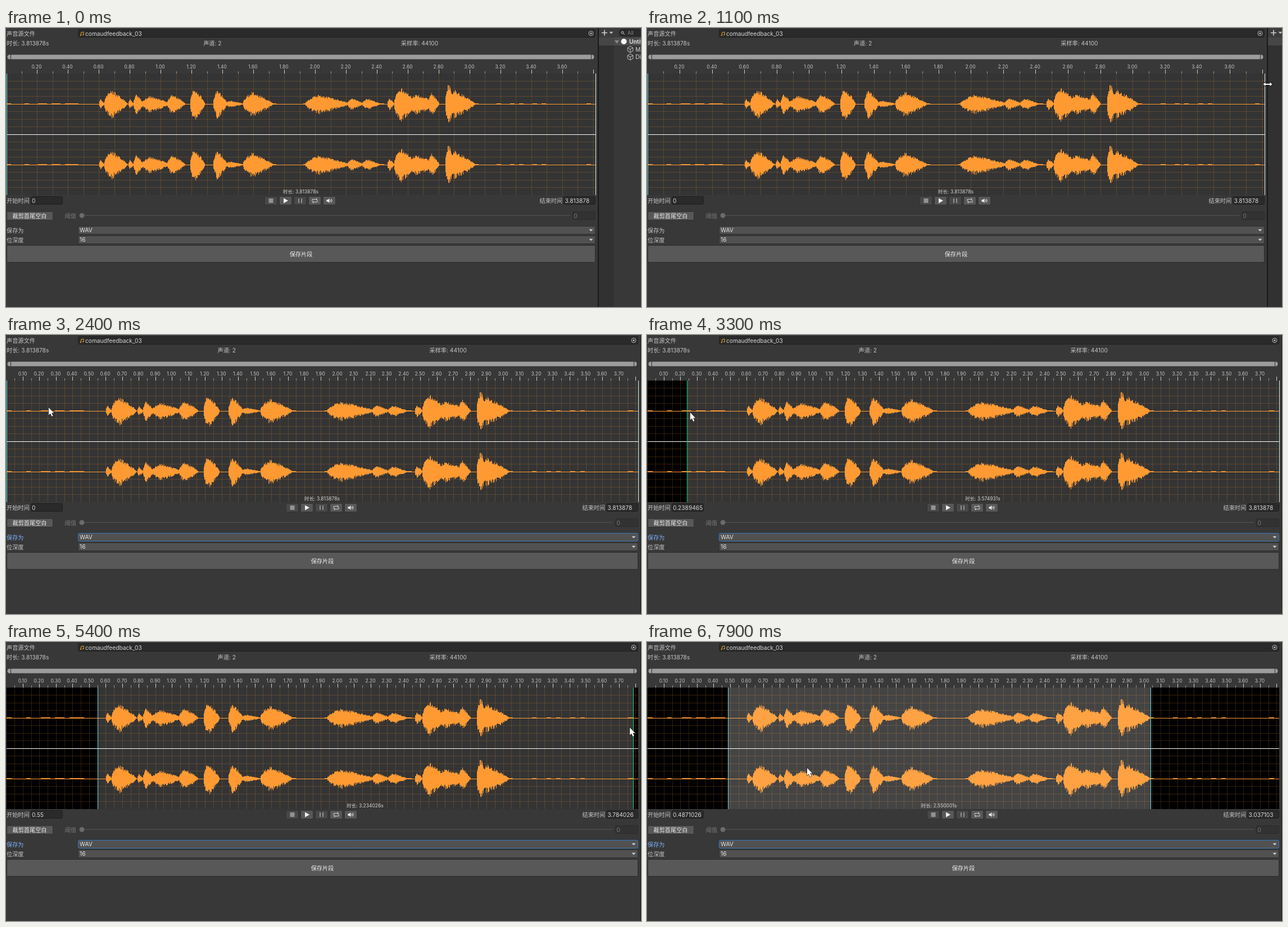
These frames come from a looping animation (1130x496 px, 8000 ms). An HTML page with a canvas:

```html
<!DOCTYPE html>
<html lang="zh">
<head>
<meta charset="utf-8">
<title>Audio clip editor</title>
<style>
html, body { margin: 0; width: 100%; height: 100%; overflow: hidden; background: #383838; }
canvas { display: block; }
</style>
</head>
<body>
<canvas id="stage" width="1130" height="496"></canvas>
<script>
const ctx = document.getElementById('stage').getContext('2d');
const LOOP = 8000, STEP = 100, LENGTH = 3.813878, SAMPLES = 1049;
const TOP = 81, BOTTOM = 297, MIDDLE = 189, HEIGHT = BOTTOM - TOP;
const ORANGE = '#ff9a33', GRID = 'rgba(255,150,45,.19)', LABEL = '#c4c4c4', VALUE = '#d6d6d6';
const CYAN = '#6fdcdc', GREEN = '#12d488';
const FAMILY = 'Inter, "Noto Sans CJK SC", "Noto Sans CJK", sans-serif';

// Spoken syllables: first sample, last sample, loudness
const syllables = [
  [164, 174, 9], [173, 215, 26], [216, 226, 9], [225, 244, 18], [240, 292, 15], [285, 318, 18],
  [326, 353, 30], [367, 393, 26], [388, 422, 6], [420, 475, 22], [531, 612, 17], [606, 635, 11],
  [632, 665, 10], [677, 690, 11], [689, 730, 31], [712, 768, 18], [750, 770, 21], [780, 800, 39], [782, 834, 25]
];

const clamp = v => Math.min(1, Math.max(0, v));
const smooth = k => k * k * (3 - 2 * k);
const noise = n => { const s = Math.sin(n * 127.1 + 11.7) * 43758.5453; return s - Math.floor(s); };

// Quick attack, slower decay
function swell(u) {
  if (u <= 0 || u >= 1) return 0;
  return u < .3 ? Math.sqrt(u / .3) : ((1 - u) / .7) ** .8;
}
const wave = Array.from({ length: SAMPLES }, (_, i) => {
  const loud = Math.max(...syllables.map(([from, to, height]) => height * swell((i - from) / (to - from))));
  return [loud * (.68 + .32 * noise(i)), loud * 1.08 * (.58 + .42 * noise(i + 5000))];
});

// Eased movement through key points [time, ...values]
function track(keys, t) {
  const next = keys.findIndex(key => t <= key[0]);
  if (next <= 0) return keys.at(next).slice(1);
  const a = keys[next - 1], b = keys[next], k = smooth((t - a[0]) / (b[0] - a[0]));
  return a.slice(1).map((v, i) => v + (b[i + 1] - v) * k);
}

const startKeys = [[2900, 0], [3800, .573], [4100, .5689366], [4300, .55], [7450, .55], [7900, .4871026]];
const endKeys = [[5300, LENGTH], [6100, 3.119143], [6400, 3.1]];
const pointerKeys = [
  [100, 1113, 46], [400, 1054, 105], [1100, 1105, 100], [1800, 1129, 103], [2400, 76, 129], [2800, 7, 136],
  [4400, 168, 144], [4800, 1118, 148], [5300, 1119, 152], [6300, 909, 159], [6900, 908, 159],
  [7200, 470, 327], [7500, 304, 230], [7900, 285, 224]
];
const panelWidth = t => Math.round(1049 + 76 * (1 - (1 - clamp((t - 700) / 1120)) ** 2.4));

const dragsPanel = t => t >= 400 && t <= 1800;
const dragsStart = t => t >= 3000 && t < 4500;
const dragsEnd = t => t >= 5400 && t < 7000;
const dragsRange = t => t >= 7500;

function box(x, y, w, h, fill, stroke, radius = 2) {
  ctx.beginPath();
  ctx.roundRect(x + .5, y + .5, w - 1, h - 1, radius);
  ctx.fillStyle = fill;
  ctx.fill();
  if (stroke) { ctx.strokeStyle = stroke; ctx.lineWidth = 1; ctx.stroke(); }
}
function rect(x, y, w, h, fill) { ctx.fillStyle = fill; ctx.fillRect(x, y, w, h); }
function text(str, x, y, color = LABEL, size = 10.2, align = 'left', weight = 400) {
  ctx.font = `${weight} ${size}px ${FAMILY}`;
  ctx.textAlign = align;
  ctx.fillStyle = color;
  ctx.fillText(str, x, y + size * .36);
}
function shape(d, x, y, fill, stroke, width = 1) {
  const path = new Path2D(d);
  ctx.save();
  ctx.translate(x, y);
  if (stroke) { ctx.strokeStyle = stroke; ctx.lineWidth = width; ctx.stroke(path); }
  if (fill) { ctx.fillStyle = fill; ctx.fill(path); }
  ctx.restore();
}
const DOWN = 'M-3.5-1.8h7L0 1.9z';
const dot = (x, y, r, fill) => box(x - r - .5, y - r - .5, r * 2 + 1, r * 2 + 1, fill, null, r);

function header(right) {
  text('声音源文件', 1, 10);
  box(128, 2, right - 128, 15, '#2a2a2a', '#212121');
  shape('M1.5 6V1L6 0V5', 132, 7, null, '#e8a52c');
  dot(132.7, 13, 1.1, '#e8a52c');
  dot(137.2, 12, 1.1, '#e8a52c');
  text('comaudfeedback_03', 141, 10, VALUE);
  shape('M4 0A4 4 0 1 1-4 0A4 4 0 1 1 4 0', right - 8, 9.5, null, '#bdbdbd');
  dot(right - 8, 9.5, 1.6, '#bdbdbd');
  text(`时长: ${LENGTH}s`, 1, 27);
  text('声道: 2', right / 3 + 1.5, 27);
  text('采样率: 44100', right * 2 / 3 + 3.5, 27);
  box(2, 47, right - 4, 9, '#9c9c9c', null, 4);
  for (const x of [8, right - 8]) rect(x, 47, 1, 9, '#333');
}

function drawWave(right, center) {
  for (let x = 1; x < right; x++) {
    const i = Math.floor((x - 1) / (right - 1) * SAMPLES), [up, down] = wave[i];
    const above = Math.max(up, noise(i >> 3) > .7 ? 1 : 0);
    rect(x, center - above, 1, above + Math.max(1, down), ORANGE);
  }
}

function timeline(right, start, end, toX, t) {
  const startX = Math.floor(toX(start)), endX = Math.floor(toX(end));
  const unit = right > 1110 ? .05 : .1;

  rect(1, TOP, right - 1, HEIGHT, '#000');
  rect(startX, TOP, endX - startX, HEIGHT, '#343434');

  for (let i = 1; i * unit < LENGTH; i++) {
    const x = Math.floor(toX(i * unit)), major = i % 2 === 0;
    rect(x, TOP, 1, HEIGHT, GRID);
    rect(x, major ? 74 : 77, 1, major ? 7 : 4, major ? '#d0d0d0' : '#999');
    if (major && i * unit < 3.75) text((i * unit).toFixed(2), x - .5, 69, LABEL, 8.5, 'center');
  }
  for (let i = 1; i < 16; i++) rect(1, Math.floor(TOP + i * 13.5), right - 1, 1, GRID);

  drawWave(right, 135);
  drawWave(right, 243);
  if (dragsRange(t)) rect(startX, TOP, endX - startX, HEIGHT, 'rgba(255,255,255,.08)');
  rect(1, MIDDLE, right - 1, 1, '#fff');
  rect(startX, TOP, 1, HEIGHT, dragsStart(t) ? GREEN : CYAN);
  rect(endX, TOP, 1, HEIGHT, dragsEnd(t) ? GREEN : end < LENGTH ? CYAN : '#d8eeee');
  text(`时长: ${(end - start).toFixed(6)}s`, (startX + endX) / 2 - .5, 290.5, VALUE, 8.5, 'center');
}

function transport(right, start, end) {
  text('开始时间', 1, 307);
  box(44, 299, 57, 15, '#2a2a2a', '#1f1f1f');
  text(String(+start.toFixed(7)), 46, 307, VALUE);
  text('结束时间', right - 99.5, 307);
  box(right - 57, 299, 57, 15, '#2a2a2a', '#1f1f1f');
  text(String(+end.toFixed(6)), right - 54.5, 307, VALUE);

  const left = Math.round(right / 2 - 64.5);
  const iconX = i => left + i * 26 + 11.5;
  for (let i = 0; i < 5; i++) {
    const disabled = i === 0 || i === 2;
    box(left + i * 26, 299, 23, 16, disabled ? '#484848' : '#585858', '#323232');
  }
  rect(iconX(0) - 4, 303, 8, 8, '#929292');
  shape('M-3.5-4.5L4.5 0L-3.5 4.5z', iconX(1), 307, '#f2f2f2');
  shape('M-3.5-4h2v8h-2zM1.5-4h2v8h-2z', iconX(2), 307, '#929292');
  shape('M-4.5 1V-2.5H4M2-4.5L4.2-2.5L2-.5M4.5-1V2.5H-4M-2 .5L-4.2 2.5L-2 4.5', iconX(3), 307, null, '#cfcfcf');
  shape('M-5-1.7h2.5L0-4V4L-2.5 1.7H-5z', iconX(4), 307, '#eee');
  shape('M1.5-1.8Q3 0 1.5 1.8M3.2-3.2Q6 0 3.2 3.2', iconX(4), 307, null, '#eee');
}

function dropdown(right, y, name, value, active) {
  text(name, 1, y + 8, active ? '#7baefa' : LABEL);
  box(128, y, right - 128, 15, '#515151', active ? '#3a79bb' : '#303030');
  text(value, 131, y + 7.5, '#e4e4e4');
  shape(DOWN, right - 8, y + 7.5, '#d0d0d0');
}

function settings(right, focused) {
  box(1, 326, 83, 16, '#585858', '#303030');
  text('裁剪首尾空白', 42, 334, '#eee', 10.2, 'center');
  text('阈值', 104.5, 334, '#797979');
  rect(131, 332.5, right - 176, 1.5, '#4d4d4d');
  dot(135, 333.3, 4.4, '#6b6b6b');
  box(right - 41, 326, 41, 15, '#323232', '#2b2b2b');
  text('0', right - 38.5, 334, '#797979');
  dropdown(right, 352, '保存为', 'WAV', focused);
  dropdown(right, 369, '位深度', '16', false);
  box(1, 386, right - 1, 31, '#585858', '#2c2c2c');
  text('保存片段', right / 2 + .5, 402, '#eee', 10.2, 'center');
}

function sceneItem(name, y) {
  shape('M0-5.5L4.8-2.8V2.8L0 5.5L-4.8 2.8V-2.8zM-4.8-2.8L0 0L4.8-2.8M0 0V5.5', 1111, y, null, LABEL);
  text(name, 1120, y, VALUE);
}

function hierarchy(right) {
  ctx.save();
  ctx.translate(right - 1049, 0);
  rect(1053, 0, 100, 496, '#383838');
  rect(1054, 0, 28, 496, '#313131');
  rect(1054, 0, 100, 17, '#3c3c3c');
  rect(1054, 17, 28, 14, '#464646');
  rect(1082, 17, 72, 14, '#4d4d4d');
  rect(1053, 0, 2, 496, '#191919');
  shape('M-5 0H5M0-5V5', 1065, 8.5, null, '#d2d2d2', 1.6);
  shape(DOWN, 1077, 8.5, LABEL);
  box(1091, 2, 70, 13, '#2a2a2a', '#212121', 5);
  shape('M2 0A2 2 0 1 1-2 0A2 2 0 1 1 2 0M1.5 1.5L4 4', 1097, 8, null, LABEL);
  text('All', 1106, 8.5, '#858585', 9);
  shape('M-4-2.5h8L0 3z', 1087, 24.5, '#8a8a8a');
  dot(1099.5, 24, 5, '#fff');
  text('Untitled', 1109, 24, VALUE, 10.2, 'left', 700);
  sceneItem('Main Camera', 38);
  sceneItem('Directional Light', 51.5);
  ctx.restore();
}

function pointer(t, right, startX, endX) {
  if (t < 100) return;
  let [x, y] = track(pointerKeys, t);
  if (dragsPanel(t)) {
    shape('M-8 0L-4-3.5V-1H4V-3.5L8 0L4 3.5V1H-4V3.5z', right + 5.5, y, '#fff', '#111', 1.6);
    return;
  }
  if (dragsStart(t)) x = startX + 5.5;
  if (dragsEnd(t)) x = endX - 6;
  if (t >= 6900) [x] = track(pointerKeys, t);
  shape('M0 0V13.2L3 10.5L5.3 15.8L7.6 14.8L5.3 9.6H9.3z', x, y, '#fff', '#1a1a1a', 1.2);
}

function draw(t) {
  const right = panelWidth(t);
  const [start] = track(startKeys, t);
  const end = dragsRange(t) ? start + 2.5500006 : track(endKeys, t)[0];
  const toX = s => 1 + s / LENGTH * (right - 1);
  rect(0, 0, 1130, 496, '#383838');
  header(right);
  timeline(right, start, end, toX, t);
  transport(right, start, end);
  settings(right, t >= 1300);
  hierarchy(right);
  pointer(t, right, toX(start), toX(end));
}

let shown = -1;
const began = performance.now();
function tick() {
  const t = Math.floor((performance.now() - began) % LOOP / STEP) * STEP;
  if (t !== shown) draw(shown = t);
  requestAnimationFrame(tick);
}
tick();
</script>
</body>
</html>
```
